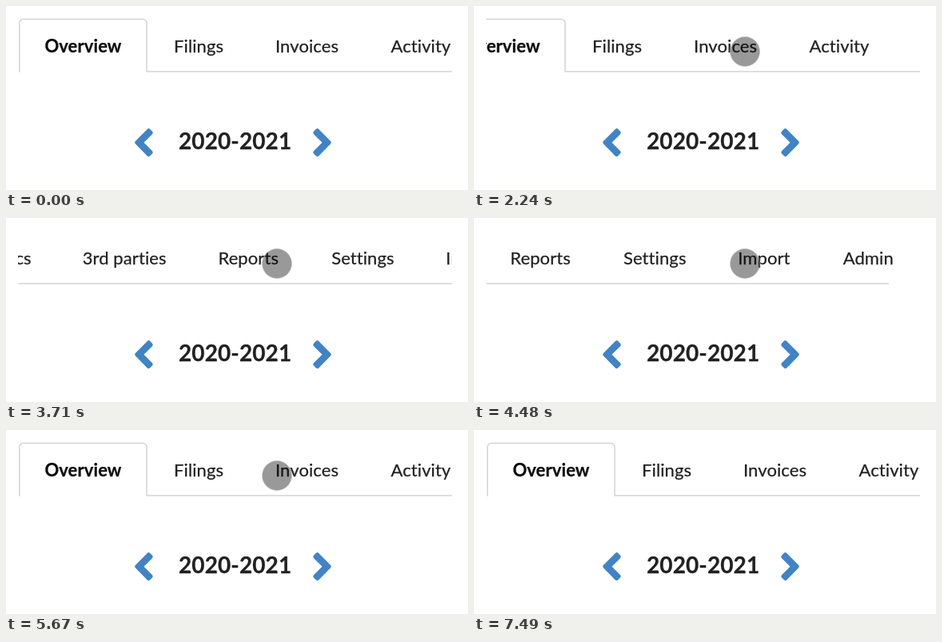
These frames come from a looping animation (578x230 px, 8.33 s). An HTML page with a canvas:

```html
<!DOCTYPE html>
<html lang="en">
<head>
<meta charset="utf-8">
<title>Scrolling tabs</title>
<style>
  html, body { margin: 0; width: 100%; height: 100%; overflow: hidden; background: #fff; }
  canvas { display: block; }
</style>
</head>
<body>
<canvas id="stage" width="578" height="230"></canvas>
<script>
const ctx = document.getElementById('stage').getContext('2d');
const LOOP = 8330, STEP = 70;
const VIEW = { left: 15, right: 558 };
const LINE_Y = 82, LINE_END = 1496;
const TABS = [
  ['Filings', 210], ['Invoices', 337], ['Activity', 481.5], ['Tasks', 622],
  ['Docs', 739], ['3rd parties', 852.5], ['Reports', 1022.3], ['Settings', 1164],
  ['Import', 1307.2], ['Admin', 1438.7]
];

const sine = u => (1 - Math.cos(Math.PI * u)) / 2;
const flick = u => 1 - (1 - u) ** 7;
const drag = u => 0.62 * sine(u) + 0.38 * u;

// Scroll gestures: start time, end time, offset reached, easing
const GESTURES = [
  [2030, 2870, 423, sine],
  [3220, 3850, 819, drag],
  [4130, 4480, 977, flick],
  [5180, 5670, 0, sine]
];

const progress = (t, a, b) => Math.min(1, Math.max(0, (t - a) / (b - a)));

function scrollAt(t) {
  let x = 0;
  for (const [start, end, to, ease] of GESTURES) {
    x += (to - x) * ease(progress(t, start, end));
  }
  return x;
}

// The slight spacing also keeps "ti" and "tt" from joining into ligatures
function text(str, x, y, font, color) {
  ctx.font = font + ' Lato, sans-serif';
  ctx.letterSpacing = '0.1px';
  ctx.fillStyle = ctx.strokeStyle = color;
  ctx.lineWidth = 0.25;
  ctx.fillText(str, x, y);
  ctx.strokeText(str, x, y);
}

function drawTabs(scroll) {
  ctx.save();
  ctx.beginPath();
  ctx.rect(VIEW.left, 0, VIEW.right - VIEW.left, 100);
  ctx.clip();
  ctx.translate(-scroll, 0);
  ctx.strokeStyle = '#d4d4d5';
  ctx.lineWidth = 1.5;
  ctx.beginPath();
  ctx.moveTo(16.8, LINE_Y + 0.7);
  ctx.arcTo(16.8, 16.5, 30, 16.5, 5);
  ctx.arcTo(176, 16.5, 176, 30, 5);
  ctx.lineTo(176, LINE_Y);
  ctx.lineTo(LINE_END, LINE_Y);
  ctx.stroke();
  text('Overview', 48.4, 58, 'bold 22px', '#0d0d0d');
  for (const [label, x] of TABS) text(label, x, 58, '22px', '#212121');
  ctx.restore();
}

function drawChevron(x, dir) {
  ctx.save();
  ctx.translate(x, 170.7);
  ctx.scale(dir, 1);
  ctx.beginPath();
  for (const [px, py] of [[2.5, 0], [17.4, -15.2], [20.4, -12.2], [8.2, 0], [20.4, 12.2], [17.4, 15.2]]) {
    ctx.lineTo(px, py);
  }
  ctx.closePath();
  ctx.fillStyle = ctx.strokeStyle = '#4183c4';
  ctx.lineWidth = 4.6;
  ctx.lineJoin = 'round';
  ctx.fill();
  ctx.stroke();
  ctx.restore();
}

function drawTouch(alpha) {
  if (alpha <= 0) return;
  ctx.save();
  ctx.globalAlpha = alpha;
  ctx.beginPath();
  ctx.arc(339, 57, 18.5, 0, Math.PI * 2);
  ctx.fillStyle = 'rgba(0, 0, 0, 0.4)';
  ctx.fill();
  ctx.strokeStyle = 'rgba(190, 190, 190, 0.6)';
  ctx.lineWidth = 1;
  ctx.stroke();
  ctx.restore();
}

function frame(now) {
  const t = Math.floor((now % LOOP) / STEP) * STEP;
  ctx.fillStyle = '#fff';
  ctx.fillRect(0, 0, 578, 230);
  drawTabs(scrollAt(t));
  drawChevron(161, 1);
  drawChevron(407, -1);
  text('2020-2021', 216, 179, 'bold 28px', '#212121');
  drawTouch(progress(t, 1400, 1750) - progress(t, 6440, 6720));
  requestAnimationFrame(frame);
}
requestAnimationFrame(frame);
</script>
</body>
</html>
```
